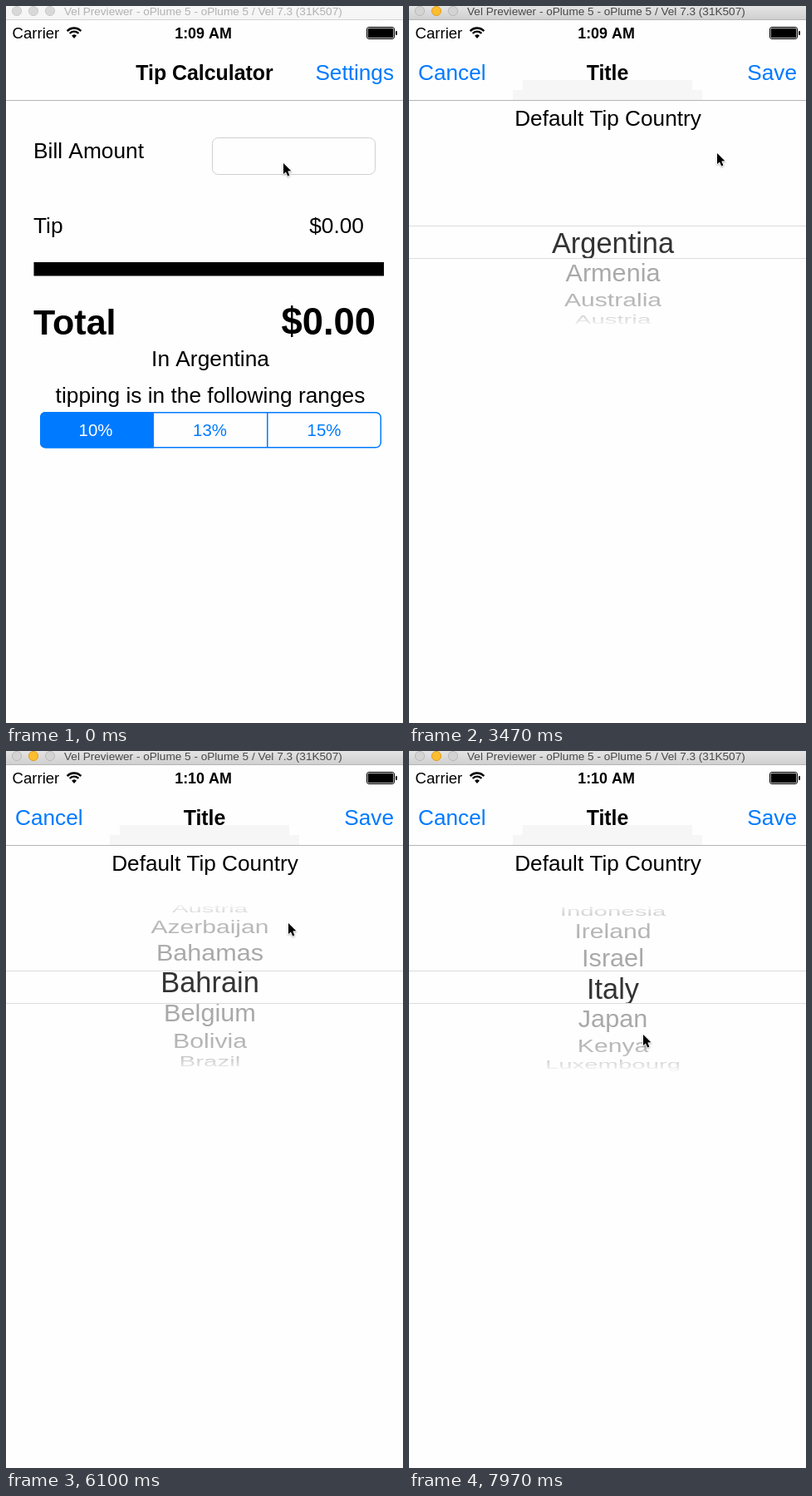
Animation, 478 px wide and 862 px high, one loop 8000 ms. Source, as an HTML page with a canvas:

```html
<!DOCTYPE html>
<html lang="en">
<head>
<meta charset="utf-8">
<title>Tip Calculator</title>
<style>
  html, body { margin: 0; width: 100%; height: 100%; overflow: hidden; background: #fefefe; }
  canvas { display: block; width: 478px; height: 862px; }
</style>
</head>
<body>
<canvas id="stage" width="478" height="862"></canvas>
<script>
const ctx = document.getElementById('stage').getContext('2d');
const W = 478, H = 862, LOOP = 8000;
const PAPER = '#fefefe', BLUE = '#007aff', HAZE = '#f6f6f6';
const SANS = '"Liberation Sans", Arial, sans-serif';

const COUNTRIES = ('Argentina,Armenia,Australia,Austria,Azerbaijan,Bahamas,Bahrain,Belgium,Bolivia,Brazil,' +
  'Bulgaria,Canada,Cayman Islands,Chile,China,Colombia,Costa Rica,Cuba,Czech Rep,Denmark,Ecuador,Egypt,' +
  'Fiji,Finland,France,Germany,Greece,Hong Kong,Hungary,Iceland,India,Indonesia,Ireland,Israel,Italy,' +
  'Japan,Kenya,Luxembourg,Malaysia').split(',');

// The screen refreshes once per beat; all motion is timed in beats.
const FIRST_BEAT = 497, BEAT = 146.47;
const WAKE = 16, NEW_MINUTE = 26;

// Pointer glides: start beat, end beat, destination
const GLIDES = [[0, 3, 298, 397], [5, 7, 396, 218], [8, 12, 438, 75], [18, 21, 371, 177],
  [21, 24, 300, 468], [24, 33, 306, 366], [37, 39, 340, 207], [39, 45, 309, 346],
  [46, 48, 339, 174], [48, 52, 282, 341]];

// Wheel flicks: start beat, length, row where it settles
const FLICKS = [[25, 4, 2], [38, 8.25, 15], [46, 6.8, 34]];

const clamp = u => Math.min(1, Math.max(0, u));
const smooth = u => u * u * (3 - 2 * u);
const settle = u => 1 - (1 - u) ** 3;

function pointerAt(beat) {
  let x = 334, y = 189;
  for (const [start, end, toX, toY] of GLIDES) {
    const u = smooth(clamp((beat - start) / (end - start)));
    x += (toX - x) * u;
    y += (toY - y) * u;
  }
  return [x, y];
}

const wheelAt = beat => FLICKS.reduce(
  (row, [start, length, to]) => row + (to - row) * settle(clamp((beat - start) / length)), 0);

function text(str, x, y, size, { color = '#000', align = 'left', bold = false } = {}) {
  ctx.font = `${bold ? 'bold ' : ''}${size}px ${SANS}`;
  ctx.textAlign = align;
  ctx.fillStyle = color;
  ctx.fillText(str, x, y);
}

function rect(x, y, w, h, color) {
  ctx.fillStyle = color;
  ctx.fillRect(x, y, w, h);
}

function rounded(x, y, w, h, r) {
  ctx.beginPath();
  ctx.roundRect(x, y, w, h, r);
}

function clipped(y0, y1, draw) {
  ctx.save();
  ctx.beginPath();
  ctx.rect(0, y0, W, y1 - y0);
  ctx.clip();
  draw();
  ctx.restore();
}

function titleBar(active) {
  const shade = ctx.createLinearGradient(0, 0, 0, 16);
  shade.addColorStop(0, active ? '#e4e4e4' : '#f7f7f7');
  shade.addColorStop(1, active ? '#d0d0d0' : '#f5f5f5');
  rect(0, 0, W, 16, shade);
  rect(0, 16, W, 1, active ? '#b4b4b4' : '#d4d4d4');
  for (let i = 0; i < 3; i++) {
    const lit = active && i === 1;
    ctx.beginPath();
    ctx.arc(13 + 20 * i, 6, 5.6, 0, 7);
    ctx.fillStyle = lit ? '#fdbd2f' : active ? '#d3d3d3' : '#d8d8d8';
    ctx.fill();
    ctx.lineWidth = 1;
    ctx.strokeStyle = lit ? '#dfa023' : active ? '#b9b9b9' : '#cbcbcb';
    ctx.stroke();
  }
  text('Vel Previewer - oPlume 5 - oPlume 5 / Vel 7.3 (31K507)', 70, 11, 13.6,
    { color: active ? '#484848' : '#b2b2b2' });
}

function statusBar(clock) {
  text('Carrier', 7.5, 39, 18.6);
  text(clock, 237.5, 39, 17.9, { align: 'center', bold: true });
  ctx.strokeStyle = ctx.fillStyle = '#000';
  ctx.lineWidth = 2.3;
  for (const r of [7.3, 11.5]) {
    ctx.beginPath();
    ctx.arc(82, 38, r, -Math.PI * 0.76, -Math.PI * 0.24);
    ctx.stroke();
  }
  ctx.beginPath();
  ctx.moveTo(82, 39);
  ctx.arc(82, 38.5, 4, -Math.PI * 0.76, -Math.PI * 0.24);
  ctx.fill();
  ctx.lineWidth = 1;
  rounded(434.5, 25.5, 33, 14, 2.5);
  ctx.stroke();
  rounded(435.7, 26.7, 30.6, 11.6, 1.5);
  ctx.fill();
  rounded(469, 30, 2, 5, 1);
  ctx.fill();
}

function navBar(title, left, right) {
  rect(0, 113, W, 1, '#b5b5b5');
  text(title, 239, 89, 24.9, { align: 'center', bold: true });
  text(left, 11, 89, 26.2, { color: BLUE });
  text(right, 467, 89, 26.2, { color: BLUE, align: 'right' });
}

function segments() {
  rounded(41.75, 488.75, 409.5, 42, 6);
  ctx.lineWidth = 1.5;
  ctx.strokeStyle = BLUE;
  ctx.stroke();
  rounded(41, 488, 137, 43.5, [6, 0, 0, 6]);
  ctx.fillStyle = BLUE;
  ctx.fill();
  rect(314, 488, 1.5, 43, BLUE);
  ['10%', '13%', '15%'].forEach((label, i) =>
    text(label, 108 + i * 137.5, 517, 20.4, { color: i ? BLUE : '#fff', align: 'center' }));
}

function calculator() {
  rect(0, 17, W, H, PAPER);
  navBar('Tip Calculator', '', 'Settings');
  text('Bill Amount', 33, 183, 26.3);
  rounded(248.5, 158.5, 196, 44, 7);
  ctx.lineWidth = 1;
  ctx.strokeStyle = '#cfcfcf';
  ctx.stroke();
  text('Tip', 33, 273, 26.3);
  text('$0.00', 431, 273, 26.3, { align: 'right' });
  rect(33.5, 308, 421.5, 16.5, '#000');
  text('Total', 33, 395, 43, { bold: true });
  text('$0.00', 445, 395, 45.4, { align: 'right', bold: true });
  text('In Argentina', 246, 433, 26.3, { align: 'center' });
  text('tipping is in the following ranges', 246, 477, 26.3, { align: 'center' });
  segments();
}

// Rows sit on a cylinder seen from the front.
function wheelRows(pos, magnified) {
  const step = 0.3525, radius = 106;
  COUNTRIES.forEach((name, i) => {
    const angle = (i - pos) * step;
    if (Math.abs(angle) > 1.45) return;
    const squash = Math.cos(angle);
    const size = magnified ? 34.4 : 30.8 * (0.91 + 0.09 * squash);
    ctx.save();
    ctx.translate(245.5, 284.4 + radius * Math.sin(angle));
    ctx.scale(1, squash);
    text(name, 0, size * 0.36, size, { color: magnified ? '#333' : '#a9a9a9', align: 'center' });
    ctx.restore();
  });
}

function fade(y0, y1) {
  const veil = ctx.createLinearGradient(0, y0, 0, y1);
  veil.addColorStop(0, 'rgba(254,254,254,0.9)');
  veil.addColorStop(0.35, 'rgba(254,254,254,0.25)');
  veil.addColorStop(1, 'rgba(254,254,254,0)');
  rect(0, Math.min(y0, y1), W, Math.abs(y1 - y0), veil);
}

function picker(pos) {
  clipped(184, 264, () => wheelRows(pos, false));
  clipped(304, 385, () => wheelRows(pos, false));
  clipped(265, 303, () => wheelRows(pos, true));
  fade(184, 240);
  fade(385, 329);
  rect(0, 264, W, 1, '#dcdcdc');
  rect(0, 303, W, 1, '#dcdcdc');
}

function settings(pos) {
  rect(0, 17, W, H, PAPER);
  rect(137, 89, 204, 12, HAZE);
  rect(125, 101, 228, 12, HAZE);
  navBar('Title', 'Cancel', 'Save');
  text('Default Tip Country', 239.5, 144, 26.2, { align: 'center' });
  picker(pos);
}

function pointer(x, y) {
  ctx.save();
  ctx.translate(x, y);
  ctx.scale(0.93, 0.93);
  const arrow = new Path2D('M0 0V14L3.2 11.2L5.6 16.6L8 15.5L5.7 10.3L10 10Z');
  ctx.lineJoin = 'round';
  ctx.lineWidth = 1.8;
  ctx.strokeStyle = '#fff';
  ctx.shadowColor = 'rgba(0,0,0,0.3)';
  ctx.shadowBlur = 2;
  ctx.shadowOffsetY = 1;
  ctx.stroke(arrow);
  ctx.shadowColor = 'transparent';
  ctx.fillStyle = '#000';
  ctx.fill(arrow);
  ctx.restore();
}

function draw(time) {
  const beat = Math.max(0, Math.floor((time % LOOP - FIRST_BEAT) / BEAT) + 1);
  const slide = settle(clamp((beat - WAKE - 0.4) / 3));
  rect(0, 0, W, H, PAPER);
  if (slide < 1) calculator();
  if (slide > 0) {
    ctx.save();
    ctx.translate(0, (H - 17) * (1 - slide));
    settings(wheelAt(beat));
    ctx.restore();
  }
  titleBar(beat >= WAKE);
  statusBar(beat < NEW_MINUTE ? '1:09 AM' : '1:10 AM');
  pointer(...pointerAt(beat));
}

let began;
function tick(now) {
  began ??= now;
  draw(now - began);
  requestAnimationFrame(tick);
}
draw(0);
requestAnimationFrame(tick);
</script>
</body>
</html>
```
